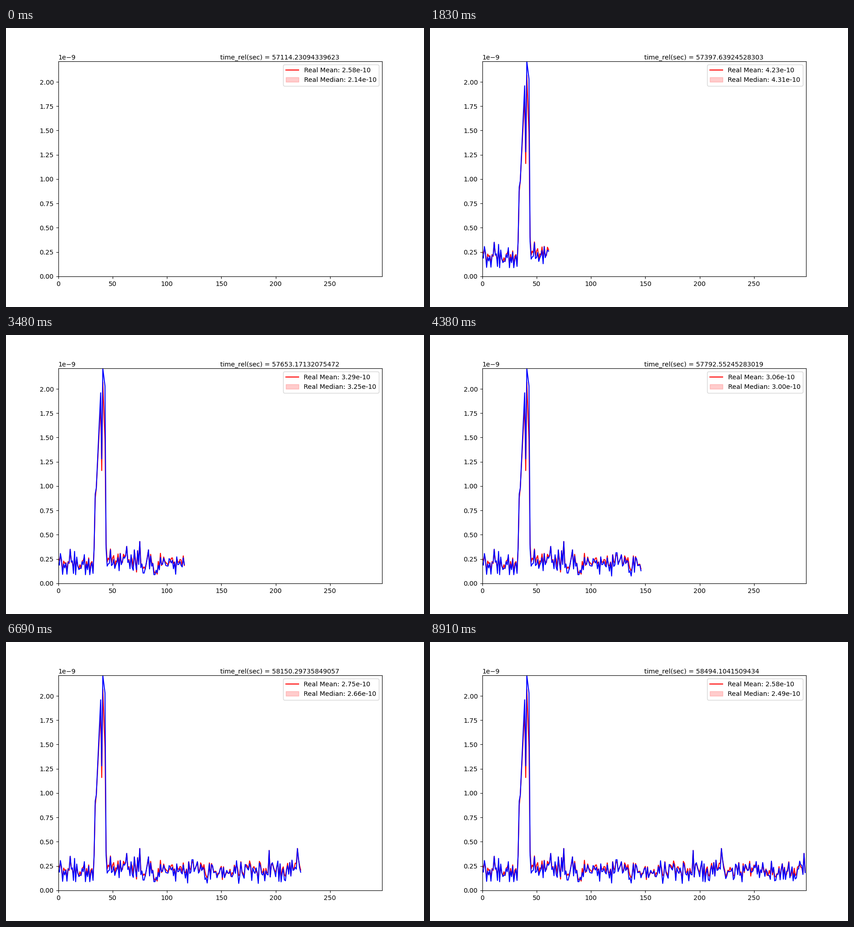
Recreate the animation shown at these times as a matplotlib script. Size 917x611 px, loop 8940 ms.

```python
import numpy as np
import matplotlib.pyplot as plt
from matplotlib.animation import FuncAnimation
from matplotlib.lines import Line2D
from matplotlib.patches import Patch

N = 298
x = np.arange(N)

# Key points, in units of 1e-9: main burst, lone peaks, running means
BURST_X = [33, 34, 35, 39, 40, 41, 43, 44]
BLUE_BURST = [0.37, 0.92, 0.98, 1.96, 1.28, 2.21, 2.03, 0.36]
RED_BURST = [0.36, 0.87, 0.98, 1.85, 1.16, 2.07, 1.47, 0.41]
PEAKS = {11: 0.35, 63: 0.38, 75: 0.43, 194: 0.41, 220: 0.43, 296: 0.38}
STOPS = [0, 36, 87, 146, 195, 250, 297]
RED_MEANS = [0.258, 0.275, 0.369, 0.306, 0.281, 0.268, 0.258]
BLUE_MEANS = [0.214, 0.265, 0.370, 0.300, 0.273, 0.259, 0.249]


def series(noise, burst, means):
    """Noise floor with burst and peaks, shifted to reach the running means."""
    y = noise.copy()
    in_burst = (x >= BURST_X[0]) & (x <= BURST_X[-1])
    y[in_burst] = np.interp(x[in_burst], BURST_X, burst)
    y[list(PEAKS)] = list(PEAKS.values())
    free = ~in_burst & ~np.isin(x, list(PEAKS))
    start = 0
    for stop, mean in zip(STOPS, means):
        part = free & (x >= start) & (x <= stop)
        y[part] += (mean * (stop + 1) - y[:stop + 1].sum()) / part.sum()
        start = stop + 1
    return y * 1e-9


def running_mean(y):
    return np.cumsum(y) / (x + 1)


rng = np.random.default_rng(4)
floor = np.clip(rng.normal(0.2, 0.065, N), 0.09, 0.33)
blue = series(floor, BLUE_BURST, BLUE_MEANS)
red = series(0.8 * floor + rng.normal(0.055, 0.02, N), RED_BURST, RED_MEANS)
red_mean, blue_mean = running_mean(red), running_mean(blue)

plt.rcParams["font.family"] = "DejaVu Sans"
fig, ax = plt.subplots(figsize=(9, 5.9968), dpi=917 / 9)
ax.set_xlim(0, N)
ax.set_ylim(0, 2.21e-9)
red_line, = ax.plot([], [], color="r")
blue_line, = ax.plot([], [], color="b")
clock = ax.text(0.5, 1.01, "", transform=ax.transAxes)
legend = ax.legend(
    [Line2D([], [], color="r"), Patch(color="r", alpha=0.2)],
    ["Real Mean: 2.58e-10", "Real Median: 2.14e-10"],
    loc="upper right")
mean_label, median_label = legend.get_texts()


def update(k):
    red_line.set_data(x[:k + 1], red[:k + 1])
    blue_line.set_data(x[:k + 1], blue[:k + 1])
    seconds = (3027054.24 + 246.24 * k) / 53
    clock.set_text(f"time_rel(sec) = {round(seconds, 11)}")
    mean_label.set_text(f"Real Mean: {red_mean[k]:.2e}")
    median_label.set_text(f"Real Median: {blue_mean[k]:.2e}")
    return red_line, blue_line, clock, legend


anim = FuncAnimation(fig, update, frames=N, interval=30,
                     repeat=True, repeat_delay=0)
plt.show()
```
